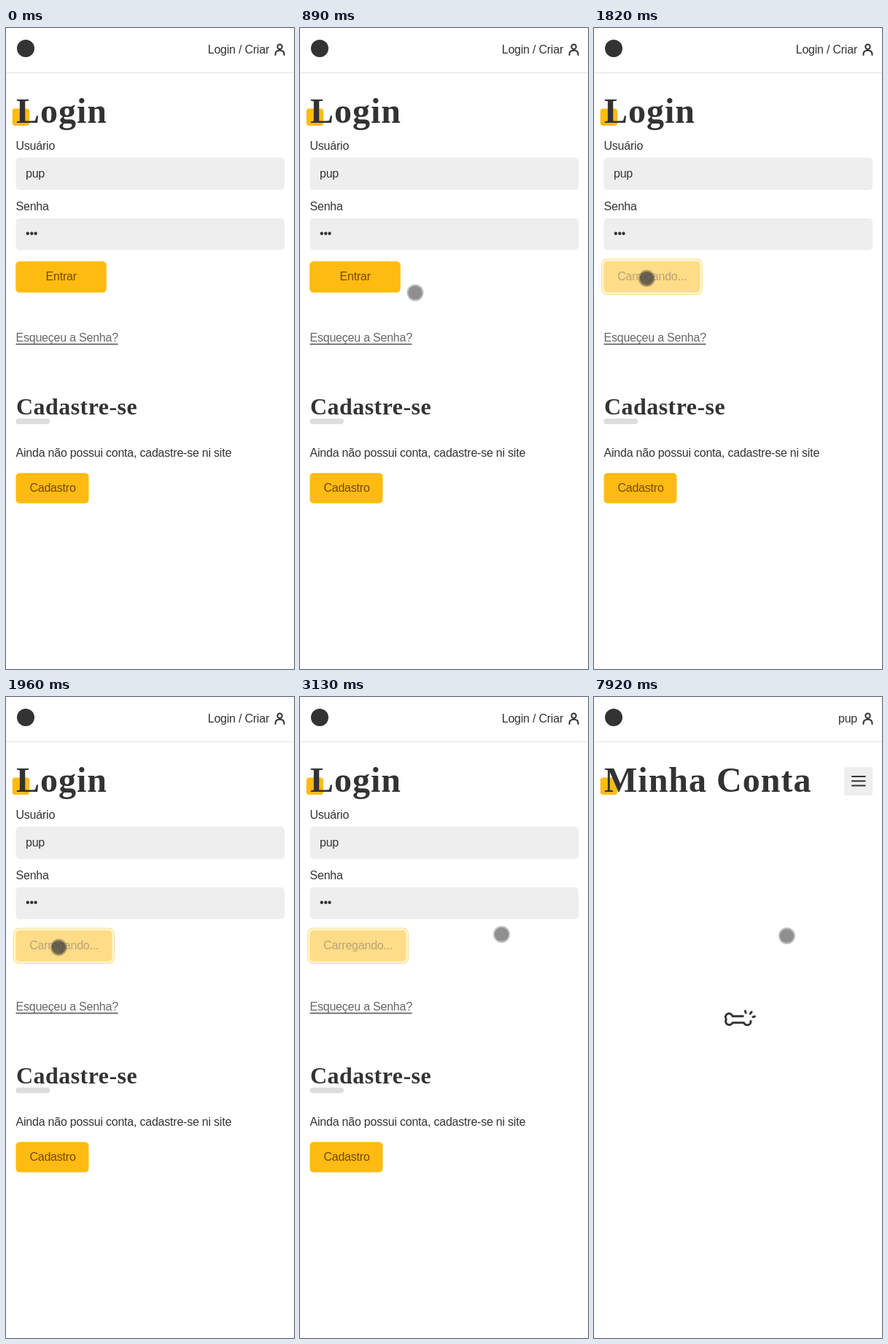
These frames come from a looping animation (395x879 px, 7990 ms). An HTML page:

```html
<!DOCTYPE html>
<html lang="pt-BR">
<head>
<meta charset="utf-8">
<title>Login</title>
<style>
  html, body { margin: 0; height: 100%; overflow: hidden; background: #fff; }
  svg { display: block; width: 100vw; height: 100vh; }
  text { font: 16px "Liberation Sans", Arial, sans-serif; letter-spacing: -.22px; fill: #333; }
  .title { font: bold 48px "Liberation Serif", serif; letter-spacing: 1px; }
  .subtitle { font: bold 32px "Liberation Serif", serif; letter-spacing: .45px; }
  .end { text-anchor: end; }
  .mid { text-anchor: middle; fill: #764701; }
  .link { fill: #666; }
  .field { fill: #eee; }
  .yellow { fill: #fb1; }
  .line { fill: none; stroke: #333; stroke-width: 2; stroke-linecap: round; stroke-linejoin: round; }
  .bone { stroke-width: 2.9; }
  #status text { font: 11.5px "Open Sans", sans-serif; letter-spacing: 0; fill: #fff; }
</style>
</head>
<body>
<svg viewBox="0 0 395 879">
  <!-- header -->
  <circle cx="27" cy="28" r="12" fill="#333"/>
  <path class="line" d="M369.5 37v-1c0-3.5 2.5-5.3 6-5.3s6 1.8 6 5.3v1"/>
  <circle class="line" cx="375.5" cy="25.8" r="3.2"/>
  <rect y="61" width="395" height="1" fill="#e4e4e4"/>
  <rect class="yellow" x="8.7" y="110.4" width="23.4" height="23.5" rx="3.9"/>

  <g id="login">
    <text class="end" x="361" y="35">Login / Criar</text>
    <text class="title" x="14" y="129.7">Login</text>
    <text x="13.5" y="167">Usuário</text>
    <rect class="field" x="13.5" y="177.7" width="368.5" height="44.3" rx="5"/>
    <text x="27" y="205">pup</text>
    <text x="13.5" y="250">Senha</text>
    <rect class="field" x="13.5" y="261" width="368.5" height="43.5" rx="5"/>
    <text x="27" y="287">•••</text>

    <g id="enter">
      <rect class="yellow" x="13.2" y="320" width="124.6" height="42.8" rx="5.5"/>
      <text class="mid" x="75.7" y="346">Entrar</text>
    </g>
    <g id="loading" opacity=".5">
      <rect class="yellow" x="10" y="316.4" width="139" height="49.7" rx="8"/>
      <rect fill="#fea" x="11" y="317.4" width="137" height="47.7" rx="7"/>
      <rect class="yellow" x="13.5" y="320" width="132" height="42.5" rx="5"/>
      <text class="mid" x="79.7" y="346">Carregando...</text>
    </g>

    <text class="link" x="13.5" y="430">Esqueçeu a Senha?</text>
    <rect x="13.5" y="432.7" width="140" height="1.8" fill="#666"/>

    <rect x="13.5" y="535.5" width="46.5" height="7.7" rx="3.8" fill="#ddd"/>
    <text class="subtitle" x="14" y="529.6">Cadastre-se</text>
    <text x="13.5" y="588">Ainda não possui conta, cadastre-se ni site</text>
    <rect class="yellow" x="13.5" y="610.3" width="100" height="41.5" rx="5"/>
    <text class="mid" x="64" y="636">Cadastro</text>
  </g>

  <g id="account">
    <text class="end" x="361" y="35">pup</text>
    <text class="title" x="14" y="129.7">Minha Conta</text>
    <rect class="field" x="343.3" y="96" width="38.7" height="39" rx="3"/>
    <path class="line" d="M354 109h17.7m-17.7 6.2h17.7m-17.7 6.4h17.7"/>
    <path id="whole" class="line bone" d="M190 437.8H205.5A4.9 4.9 0 1 1 213.6 442A4.9 4.9 0 1 1 205.5 446.6H190A4.9 4.9 0 1 1 181.4 442A4.9 4.9 0 1 1 190 437.8Z"/>
    <path id="bitten" class="line bone" d="M204.3 437.8H190A4.9 4.9 0 1 0 181.4 442A4.9 4.9 0 1 0 190 446.6H205.5A4.9 4.9 0 0 0 215 444.5M207.3 430.5l.9 2.6M216.2 431.9l-2 2.4M217.8 438.8l2.8-.8"/>
    <g id="status">
      <path d="M0 865H126.5a3 3 0 0 1 3 3V879H0Z" fill="#1b1b1b"/>
      <text x="3" y="879.4">Aguardando pupsapi...</text>
    </g>
  </g>

  <g id="cursor">
    <circle id="core" r="9.6"/>
    <circle id="ring" r="10.5" fill="none" stroke-width="2"/>
  </g>
</svg>
<script>
const LOOP = 7990, STEP = 70;
const $ = id => document.getElementById(id);
const show = (id, on) => $(id).style.display = on ? "" : "none";

// Pointer path: time, x, y
const path = [
  [200, 354.5, 867.5], [340, 282, 643], [480, 266, 418], [550, 268.5, 346.5],
  [620, 281, 340], [760, 190, 366], [830, 158, 363], [970, 82.5, 340],
  [1110, 72.3, 343.3], [2290, 72.3, 343.3], [2430, 88, 338], [2570, 122, 327],
  [2780, 214, 313], [2990, 258, 313], [3130, 276.5, 325.5],
  [7919, 276.5, 325.5], [7920, 264.5, 327.5]
];

function pointerAt(t) {
  const offset = t < 1500 ? 60 : 50;
  const tick = t >= 7920 ? t : Math.max(200, Math.floor((t - offset) / STEP) * STEP + offset);
  const next = path.findIndex(p => p[0] > tick);
  if (next < 0) return path[path.length - 1].slice(1);
  const [t0, x0, y0] = path[next - 1], [t1, x1, y1] = path[next];
  const k = (tick - t0) / (t1 - t0);
  return [x0 + (x1 - x0) * k, y0 + (y1 - y0) * k];
}

function pointerColours(t) {
  if (t >= 1620 && t < 1820) return ["rgba(100,130,5,.65)", "rgba(160,180,0,.4)"];
  if (t >= 1820 && t < 2030) return ["rgba(60,60,60,.75)", "rgba(60,60,60,.4)"];
  return ["rgba(0,0,0,.44)", "rgba(0,0,0,.25)"];
}

function draw() {
  const t = performance.now() % LOOP;
  const loggedIn = t >= 7380, bite = t >= 7710;
  show("login", !loggedIn);
  show("account", loggedIn);
  show("enter", t < 1820);
  show("loading", t >= 1820);
  show("whole", !bite);
  show("bitten", bite);
  const fade = Math.floor((t - 7640) / STEP) + 1;
  $("status").style.opacity = 1 - Math.min(3, Math.max(0, fade)) / 3;

  show("cursor", t >= 200);
  $("cursor").setAttribute("transform", `translate(${pointerAt(t)})`);
  const [core, ring] = pointerColours(t);
  $("core").style.fill = core;
  $("ring").style.stroke = ring;
  requestAnimationFrame(draw);
}
draw();
</script>
</body>
</html>
```
